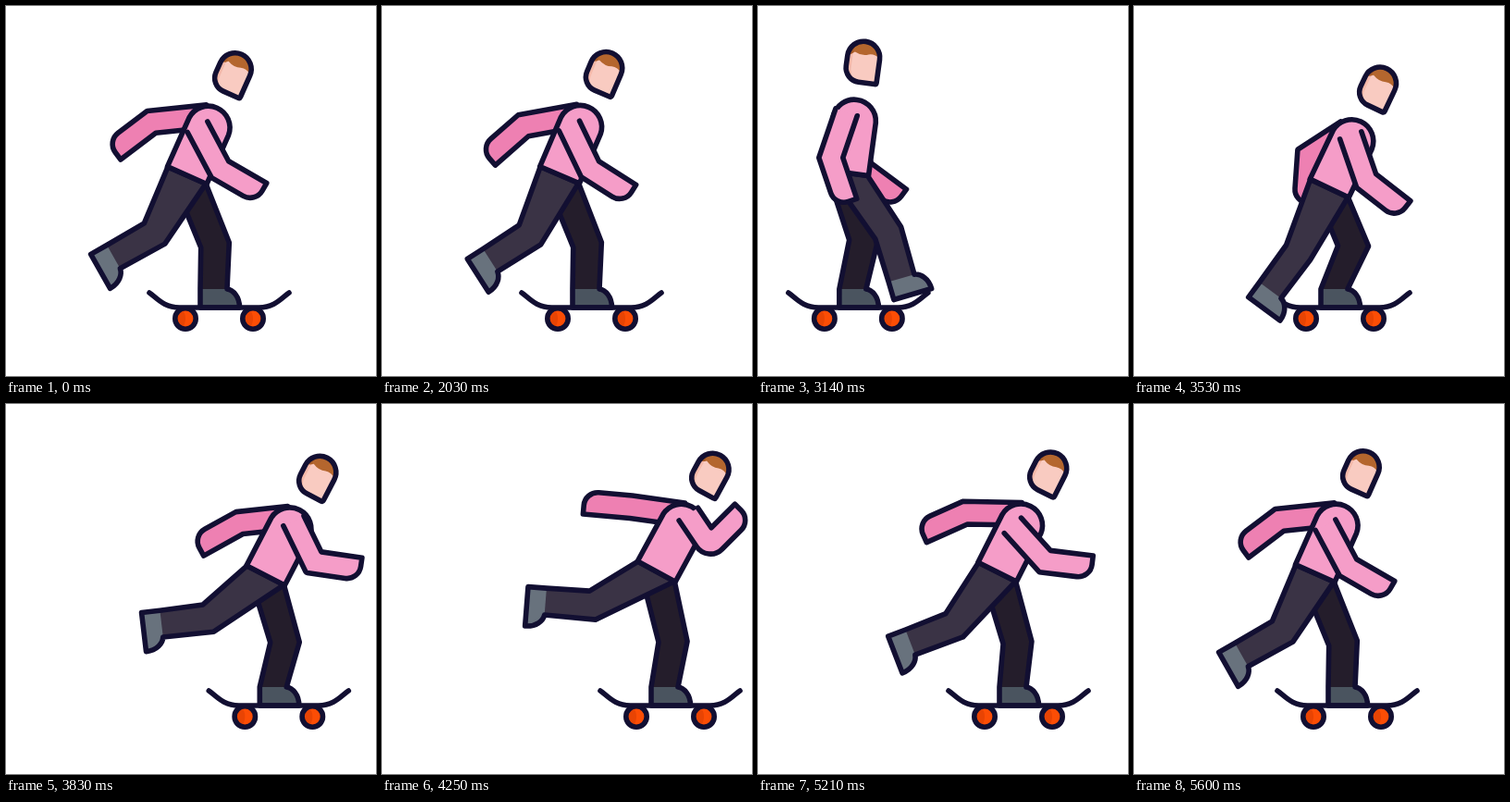
An HTML page with a canvas for the animation above (5660 ms loop, 400 by 400 pixels).

```html
<!DOCTYPE html>
<html lang="en">
<head>
<meta charset="utf-8">
<title>Skateboarder</title>
<style>
  html, body { margin: 0; height: 100%; overflow: hidden; background: #fff; }
  canvas { display: block; }
</style>
</head>
<body>
<canvas id="stage" width="400" height="400"></canvas>
<script>
const ctx = document.getElementById('stage').getContext('2d');
const LOOP = 5660, HOLD = 2000, STEP = 30, STEPS = 120;
const INK = '#120f32', PINK = '#f59dc8', PINK_FAR = '#ee80b2';

// step, board x | hip dx, hip y, lean | knee dx, y | thigh, its length, shin |
// near arm: upper, lower, shoulder shift | far arm: upper, lower, upper length
// Limb angles in degrees: 0 hangs down, positive swings forward.
const POSES = [
  [0, 230.5,   -35, 183, 24,       -4.5, 258.5,  -29, 72, -60.5,  28, 60, -11,   -84, -53, 61],
  [20, 150.5,  -15, 169, 0,        -0.5, 247.5,  47.5, 80, 25,    -30, 9, -12,    38, 62, 56],
  [35, 103.5,  -14, 171, 4,         1, 249,      44, 79, 22,      -26, 12, -12,   30, 58, 55],
  [44, 143,     -8, 204, 18,       18, 262,       5, 78, -3,        2, 38, -6,   -12, 36, 52],
  [51, 222.5, -11.5, 197, 25.4,    14.5, 259.5, -25.7, 77, -36.5,  19, 52, 0,    -57, -4, 49],
  [58, 285.5,  -14, 187, 27,        8, 258,     -49, 77, -77,      24, 70, 5,    -79, -50, 53],
  [75, 311.5,  -15, 181, 28.5,      3, 257,     -62, 78, -94.5,    34, 135, 12,  -98, -95, 57],
  [90, 314.5,  -18, 181, 28,        1, 257.5,   -53, 76, -85,      38, 112, 1,   -96, -82, 59],
  [107, 281.5, -23, 181.5, 26.8,   -1, 258,   -38.7, 74, -69,      42, 83, -8,   -91, -66, 61]
];

function key(i) {
  const n = POSES.length, turn = Math.floor(i / n), row = POSES[i - turn * n];
  return [row[0] + turn * STEPS, ...row.slice(1)];
}

// Periodic cubic interpolation through the poses.
function poseAt(step) {
  let i = POSES.length - 1;
  while (POSES[i][0] > step) i--;
  const [a, b, c, d] = [i - 1, i, i + 1, i + 2].map(key);
  const span = c[0] - b[0], u = (step - b[0]) / span, v = 1 - u;
  return b.map((p, k) => {
    const m0 = (c[k] - a[k]) / (c[0] - a[0]) * span;
    const m1 = (d[k] - p) / (d[0] - b[0]) * span;
    return v * v * (1 + 2 * u) * p + u * u * (3 - 2 * u) * c[k] + u * v * (v * m0 - u * m1);
  });
}

const rad = deg => deg * Math.PI / 180;
const angleTo = ([x0, y0], [x1, y1]) => Math.atan2(x1 - x0, y1 - y0) * 180 / Math.PI;

// Point in a limb's own frame: x forward across it, y along it.
function at([ox, oy], deg, x, y) {
  const s = Math.sin(rad(deg)), c = Math.cos(rad(deg));
  return [ox + x * c + y * s, oy - x * s + y * c];
}

function joint(p, upper, lower, half) {
  const r = half / Math.cos(rad((upper - lower) / 2)), mid = (upper + lower) / 2;
  return [at(p, mid, -r, 0), at(p, mid, r, 0)];
}

function paint(path, fill) {
  if (fill) { ctx.fillStyle = fill; ctx.fill(path); }
  ctx.stroke(path);
}

function leg(waist, knee, ankle, thigh, shin, foot, pants, shoe) {
  const [kneeB, kneeF] = joint(knee, thigh, shin, 15.2);
  const p = (x, y) => at(ankle, foot, x, y);
  const addShoe = path => {
    path.lineTo(...p(-14.5, 0));
    path.lineTo(...p(-14.5, 20));
    path.lineTo(...p(28, 20));
    path.bezierCurveTo(...p(28, 8), ...p(21, 1), ...p(14.5, 0));
  };
  const whole = new Path2D(), shoePath = new Path2D();
  whole.moveTo(...waist[0]);
  whole.lineTo(...kneeB);
  addShoe(whole);
  whole.lineTo(...kneeF);
  whole.lineTo(...waist[1]);
  whole.closePath();
  addShoe(shoePath);
  ctx.fillStyle = pants;
  ctx.fill(whole);
  ctx.fillStyle = shoe;
  ctx.fill(shoePath);
  ctx.stroke(whole);
}

function arm(shoulder, upper, lower, length, fill) {
  const half = 12.3, bend = Math.abs(upper - lower);
  const elbow = at(shoulder, upper, 0, length);
  const [back, front] = joint(elbow, upper, lower, half);
  const corner = at(elbow, lower, -half, 51), tip = at(elbow, lower, half, 51);
  const path = new Path2D();
  path.moveTo(...at(shoulder, upper, -half, 0));
  path.arcTo(...back, ...corner, Math.max(0, bend - 50) * 0.35);
  path.arcTo(...corner, ...tip, 15);
  path.lineTo(...tip);
  path.lineTo(...front);
  path.lineTo(...at(shoulder, upper, half, 0));
  paint(path, fill);
}

function board(x) {
  for (const wheelX of [x - 36.5, x + 36.5]) {
    const wheel = new Path2D(), shade = new Path2D();
    wheel.arc(wheelX, 338, 11.2, 0, 7);
    shade.ellipse(wheelX - 4, 338, 4, 9, 0, 0, 7);
    ctx.fillStyle = '#fc4d05';
    ctx.fill(wheel);
    ctx.fillStyle = '#e84404';
    ctx.fill(shade);
    ctx.stroke(wheel);
  }
  paint(new Path2D(`M${x - 75.5} 310C${x - 67} 316 ${x - 60} 326 ${x - 43} 326H${x + 43}C${x + 60} 326 ${x + 67} 316 ${x + 75.5} 310`));
}

const torso = new Path2D('M-23 0V-58A23.3 23.3 0 0 1 23.5 -58V0Z');
const head = new Path2D('M-16.5 -126A17.5 17.5 0 0 1 18.5 -126V-101Q18.5 -99 16.5 -99H-1A15.5 15.5 0 0 1 -16.5 -114.5Z');
const hair = new Path2D('M-17 -127Q-12 -128 -9 -131Q-1 -127 6 -130Q12 -132 19 -127V-145H-17Z');
const shade = new Path2D('M-17 -145H-6Q-11 -140 -11 -128V-114Q-11 -102 -1 -99H-17Z');

function inBody(hip, lean, draw) {
  ctx.save();
  ctx.translate(...hip);
  ctx.rotate(rad(lean));
  draw();
  ctx.restore();
}

function drawHead() {
  ctx.save();
  ctx.clip(head);
  for (const [path, fill] of [[head, '#f9cbc1'], [shade, '#f5b9aa'], [hair, '#b4662e']]) {
    ctx.fillStyle = fill;
    ctx.fill(path);
  }
  ctx.clip(hair);
  ctx.fillStyle = '#a65c29';
  ctx.fill(shade);
  ctx.restore();
  ctx.stroke(head);
}

function draw(step) {
  const [, x, hipX, hipY, lean, kneeX, kneeY, thigh, thighLen, shin,
    nearUp, nearLow, shift, farUp, farLow, farLen] = poseAt(step);
  const hip = [x + hipX, hipY];
  const waist = [at(hip, -lean, -22.5, 0), at(hip, -lean, 22.5, 0)];
  const chest = at(hip, -lean, 0, -58);

  ctx.fillStyle = '#fff';
  ctx.fillRect(0, 0, 400, 400);
  ctx.strokeStyle = INK;
  ctx.lineWidth = 5.6;
  ctx.lineCap = ctx.lineJoin = 'round';

  arm(at(chest, farUp, -11, 0), farUp, farLow, farLen, PINK_FAR);

  const frontKnee = [x + kneeX, kneeY], frontAnkle = [x - 6, 306];
  leg(waist, frontKnee, frontAnkle, angleTo(hip, frontKnee), angleTo(frontKnee, frontAnkle), 0, '#241d2b', '#4a545f');
  board(x);

  const knee = at(hip, thigh, 0, thighLen);
  leg(waist, knee, at(knee, shin, 0, 51), thigh, shin, shin, '#3a3345', '#68727d');

  inBody(hip, lean, () => paint(torso, PINK));
  const nearLen = 52 - Math.max(0, Math.abs(nearLow - nearUp) - 45) * 0.2;
  arm(at(chest, nearUp, shift, -5), nearUp, nearLow, nearLen, PINK);
  inBody(hip, lean, drawHead);
}

function tick() {
  const t = performance.now() % LOOP;
  draw(Math.max(0, Math.floor((t - HOLD) / STEP)) % STEPS * (t < HOLD + STEPS * STEP));
  requestAnimationFrame(tick);
}
tick();
</script>
</body>
</html>
```
